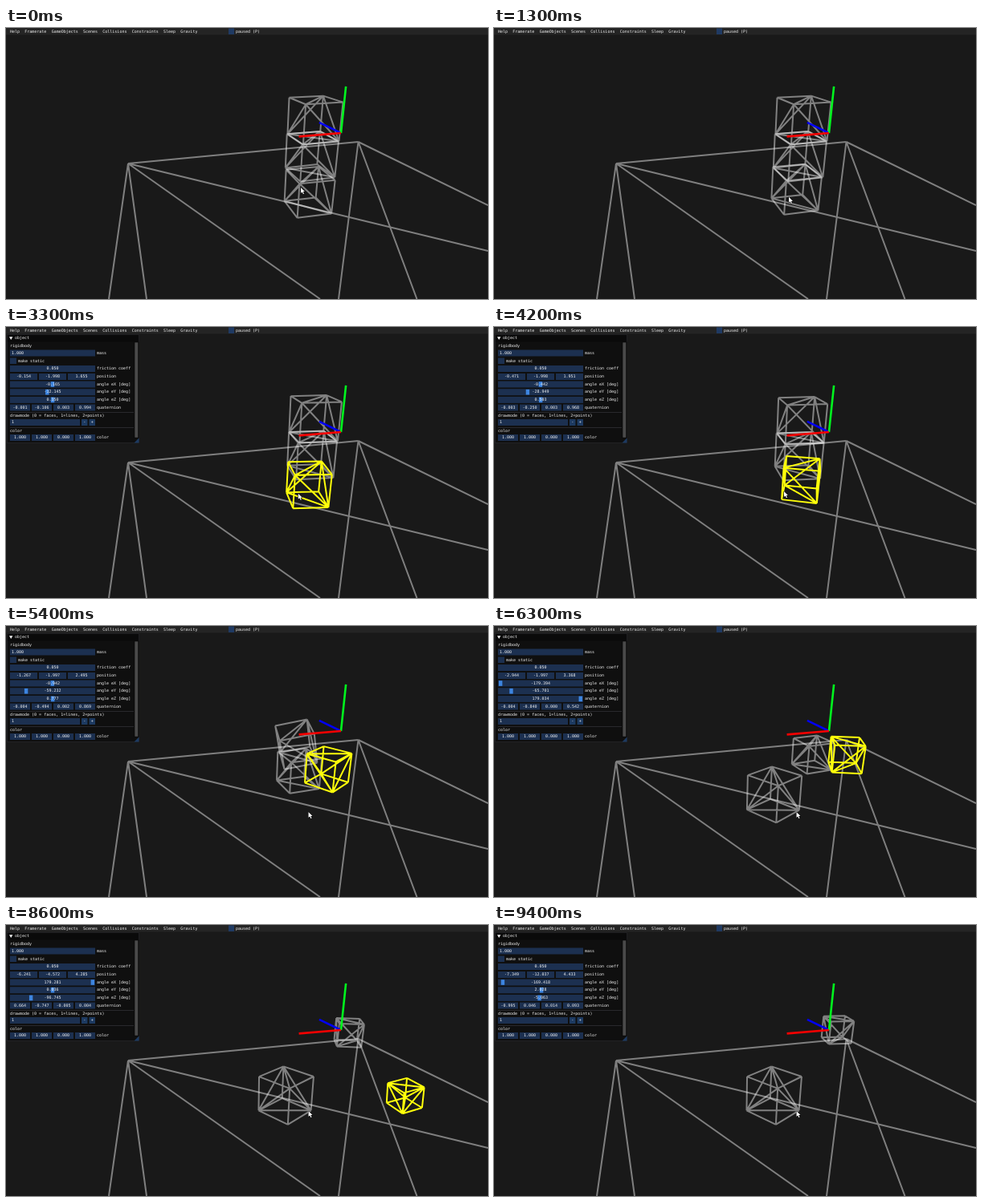
An HTML page with a canvas that plays this animation: 600x338 px, repeating every 9.5 s.

```html
<!DOCTYPE html>
<html lang="en">
<head>
<meta charset="utf-8">
<title>Rigid body stack</title>
<style>
html, body { margin: 0; width: 100%; height: 100%; overflow: hidden; background: #191919; }
canvas { display: block; width: 600px; height: 338px; }
</style>
</head>
<body>
<canvas id="stage" width="600" height="338"></canvas>
<script>
const ctx = document.getElementById('stage').getContext('2d');
const LOOP = 9500, STEP = 100;
const RAD = Math.PI / 180;
const FONT = '5px "DejaVu Sans Mono", monospace';

// Phases in seconds: settle, select, drag, slide over the floor, drop off its edge.
const UNPAUSE = 1, SELECT = 1.4, DRAG = 2.3, SLIDE = 5.4, EDGE = 7.8;

const clamp = (v, lo, hi) => Math.max(lo, Math.min(hi, v));
const span = (t, from, to) => clamp((t - from) / (to - from), 0, 1);
const smooth = u => u * u * (3 - 2 * u);
const easeOut = (u, power) => 1 - (1 - u) ** power;
const mix = (a, b, u) => a + (b - a) * u;

// ---- quaternions as [x, y, z, w] ----
function fromEuler([ex, ey, ez]) {
  return multiply(spin(2, ez), multiply(spin(1, ey), spin(0, ex)));
}
function toEuler([x, y, z, w]) {
  return [
    Math.atan2(2 * (w * x + y * z), w * w - x * x - y * y + z * z),
    Math.asin(clamp(2 * (w * y - x * z), -1, 1)),
    Math.atan2(2 * (x * y + w * z), w * w + x * x - y * y - z * z)
  ].map(a => a / RAD);
}
function axisAngle(axis, deg) {
  const half = deg * RAD / 2;
  return [...axis.map(v => v * Math.sin(half)), Math.cos(half)];
}
const spin = (axis, deg) => axisAngle([0, 1, 2].map(i => +(i === axis)), deg);
function multiply([ax, ay, az, aw], [bx, by, bz, bw]) {
  return [aw * bx + ax * bw + ay * bz - az * by, aw * by - ax * bz + ay * bw + az * bx,
          aw * bz + ax * by - ay * bx + az * bw, aw * bw - ax * bx - ay * by - az * bz];
}
function rotate(q, v) {
  const inverse = [-q[0], -q[1], -q[2], q[3]];
  return multiply(multiply(q, [...v, 0]), inverse).slice(0, 3);
}

// ---- motion ----
// Selected cube: dragged out, slides with friction, then falls and tumbles.
function bodyPose(t) {
  const sunk = 1 - smooth(span(t, UNPAUSE, SELECT));
  const u = span(t, DRAG, SLIDE);
  const s = clamp(t - SLIDE, 0, EDGE - SLIDE);
  const f = Math.max(0, t - EDGE);
  const turned = u ** 1.55;
  const dragged = fromEuler([-0.002 - 0.94 * turned, -2.285 - 56.947 * turned, 0.261 + 0.516 * turned]);
  const yawed = multiply(spin(1, -s * (68.2 - 7.8 * s)), dragged);
  const tumble = multiply(spin(2, -114.6 * Math.max(0, f - 0.07)), spin(0, 2.56 * f ** 3));
  return {
    pos: [
      -0.048 - 1.219 * u ** 2.16 - s * (2.014 - 0.168 * s) - 1.385 * f,
      -1.999 + 0.002 * u - 0.06 * sunk - f * (0.163 + 3.82 * f),
      1.489 + 1.006 * u ** 1.59 + s * (1.142 - 0.1907 * s) + 0.185 * f - 0.1 * sunk
    ],
    turn: multiply(yawed, tumble)
  };
}

// Middle cube: drops to the floor and is pushed until friction stops it.
function middlePose(t) {
  const u = span(t, DRAG, SLIDE), drop = u ** 6;
  const s = span(t, SLIDE, 9.8);
  const yaw = -12 * Math.sin(Math.PI * u) + 2 * u + 76 * smooth(span(t, SLIDE, 9.4)) ** 1.5;
  return {
    pos: [
      -0.07 - 0.22 * drop - 4.14 * easeOut(s, 2),
      -1.02 - 0.97 * drop,
      1.46 + 1.15 * drop + 3.7 * easeOut(s, 1.6)
    ],
    turn: spin(1, yaw)
  };
}

// Top cube: tips over and rolls towards the viewer.
function topPose(t) {
  const u = span(t, DRAG, SLIDE), drop = u ** 6;
  const roll = easeOut(span(t, SLIDE, 6.4), 1.5);
  const yaw = mix(-14 * Math.sqrt(u), -61, roll);
  const tilt = mix(16 * drop, 90, roll);
  return {
    pos: [
      mix(-0.1 - 0.1 * drop, 0.753, roll),
      mix(-0.03 - 1.12 * drop, -1.99, roll),
      mix(1.49 + 1.21 * drop, 1.114, roll)
    ],
    turn: multiply(axisAngle([-0.484, 0, -0.875], tilt), spin(1, yaw))
  };
}

// ---- camera ----
const YAW = 16.1 * RAD, PITCH = 20.9 * RAD, FOCAL = 408;
const EYE = { right: 2.053, up: 0.667, depth: 7.16 };
function project([x, y, z]) {
  const right = EYE.right - x * Math.cos(YAW) - z * Math.sin(YAW);
  const ahead = z * Math.cos(YAW) - x * Math.sin(YAW);
  const up = EYE.up + y * Math.cos(PITCH) + ahead * Math.sin(PITCH);
  const depth = EYE.depth + ahead * Math.cos(PITCH) - y * Math.sin(PITCH);
  return [300 + FOCAL * right / depth, 169 - FOCAL * up / depth];
}

// Cube edges plus one diagonal per face.
const bits = n => (n & 1) + (n >> 1 & 1) + (n >> 2 & 1);
const corners = [...Array(8).keys()].map(i => [0, 1, 2].map(k => (i >> k & 1) - 0.5));
const edges = [];
for (let i = 0; i < 8; i++) {
  for (let j = i + 1; j < 8; j++) {
    const d = bits(i ^ j);
    if (d === 1 || (d === 2 && bits(i) % 2 === 0)) edges.push([i, j]);
  }
}

function lines(pairs, color, width) {
  ctx.strokeStyle = color;
  ctx.lineWidth = width;
  ctx.beginPath();
  for (const [a, b] of pairs) {
    ctx.moveTo(...a);
    ctx.lineTo(...b);
  }
  ctx.stroke();
}
function drawCube({ pos, turn }, color) {
  const pts = corners.map(c => project(rotate(turn, c).map((v, i) => v + pos[i])));
  lines(edges.map(([i, j]) => [pts[i], pts[j]]), color, 2);
}

const GREY = 'rgba(255,255,255,0.45)';
function drawFloor() {
  const left = [152, 169], right = [438.5, 142];
  const fan = (from, ends) => lines(ends.map(end => [from, end]), '#7f7f7f', 2);
  fan(left, [right, [128, 338], [175, 338], [391, 338], [600, 278]]);
  fan(right, [[414, 338], [511.5, 338], [600, 221]]);
}
function drawAxes() {
  const origin = project([0, 0, 0]);
  const axis = (tip, color) => lines([[origin, project(tip)]], color, 2.6);
  axis([0, 0, 1], '#0000f5');
  axis([0, 1, 0], '#00f51e');
  axis([1, 0, 0], '#f50000');
}

// ---- interface ----
const FIELD = '#1c3050', BUTTON = '#1d3a61', GRAB = '#3d85e0', INK = '#f2f2f2';
function box(x, y, w, h, color) {
  ctx.fillStyle = color;
  ctx.fillRect(x, y, w, h);
}
function triangle(color, ...points) {
  ctx.fillStyle = color;
  ctx.beginPath();
  points.forEach(p => ctx.lineTo(...p));
  ctx.fill();
}
function text(str, x, y, align = 'left') {
  ctx.fillStyle = INK;
  ctx.textAlign = align;
  ctx.fillText(str, x, y);
}
const fixed = v => (+v.toFixed(3) || 0).toFixed(3);

function fields(values, y, label) {
  const n = values.length, w = (106 - 2 * (n - 1)) / n;
  values.forEach((v, i) => {
    const x = 5 + i * (w + 2);
    box(x, y - 4, w, 8, FIELD);
    text(fixed(v), x + w / 2, y, 'center');
  });
  text(label, 113, y);
}
function slider(value, range, y, label) {
  box(5, y - 4, 106, 8, FIELD);
  box(55.8 + 50 * value / range, y - 3.3, 4.4, 6.6, GRAB);
  text(fixed(value), 58, y, 'center');
  text(label, 113, y);
}

function drawMenu() {
  box(0, 0, 600, 8.5, '#242424');
  let x = 5;
  for (const name of 'Help Framerate GameObjects Scenes Collisions Constraints Sleep Gravity'.split(' ')) {
    text(name, x, 4.3);
    x += ctx.measureText(name).width + 6.25;
  }
  box(277, 0.5, 7, 7.5, '#1f3a63');
  text('paused (P)', 286, 4.3);
}

function drawPanel({ pos, turn }) {
  box(1.5, 9.5, 164, 135, '#0f0f0f');
  box(1.5, 9.5, 164, 9, '#0a0a0a');
  ctx.strokeStyle = '#2b2b30';
  ctx.lineWidth = 0.6;
  ctx.strokeRect(1.5, 9.5, 164, 135);
  triangle(INK, [4, 12.3], [8.4, 12.3], [6.2, 16]);
  text('object', 11, 14);

  box(159.5, 18.5, 6, 120, '#080808');
  box(160.3, 19.3, 4, 118.5, '#4a4a4a');
  triangle(BUTTON, [165.5, 138.5], [165.5, 144.5], [159.5, 144.5]);

  const angles = toEuler(turn);
  text('rigidbody', 5, 24);
  box(5, 28.5, 106, 8, FIELD);
  text('1.000', 7, 32.5);
  text('mass', 113, 32.5);
  box(5, 38.5, 8, 7.5, FIELD);
  text('make static', 15, 42.5);
  fields([0.05], 52, 'friction coeff');
  fields(pos, 62, 'position');
  ['X', 'Y', 'Z'].forEach((axis, i) => {
    slider(angles[i], i === 1 ? 90 : 180, 71.5 + 9.7 * i, `angle e${axis} [deg]`);
  });
  fields(fromEuler(angles), 100.5, 'quaternion');
  box(5, 106, 154, 0.6, '#3a3a40');
  text('drawmode (0 = faces, 1=lines, 2=points)', 5, 110.5);
  box(5, 115, 87, 8, FIELD);
  text('1', 7, 119);
  ['-', '+'].forEach((sign, i) => {
    box(94 + 9.5 * i, 115, 7.5, 8, BUTTON);
    text(sign, 97.8 + 9.5 * i, 119, 'center');
  });
  box(5, 125, 154, 0.6, '#3a3a40');
  text('color', 5, 129.5);
  fields([1, 1, 0, 1], 138, 'color');
}

function drawCursor(t) {
  const pull = smooth(span(t, DRAG, 4.2)), away = smooth(span(t, 5, SLIDE));
  ctx.save();
  ctx.translate(367 - 6 * pull + 15.5 * away, 199 + 12 * smooth(span(t, 0.1, SELECT)) - 6 * pull + 27 * away);
  const arrow = new Path2D('M0 0V7L1.7 5.5 2.9 8.2 4 7.7 2.9 5.1H5Z');
  ctx.strokeStyle = '#000';
  ctx.lineWidth = 1;
  ctx.stroke(arrow);
  ctx.fillStyle = '#fff';
  ctx.fill(arrow);
  ctx.restore();
}

function draw(t) {
  box(0, 0, 600, 338, '#191919');
  ctx.font = FONT;
  ctx.textBaseline = 'middle';
  const body = bodyPose(t), selected = t >= SELECT;
  drawFloor();
  drawCube(topPose(t), GREY);
  drawCube(middlePose(t), GREY);
  drawCube(body, selected ? '#ffff0a' : GREY);
  drawAxes();
  drawMenu();
  if (selected) drawPanel(body);
  drawCursor(t);
}

const start = performance.now();
function tick() {
  const ms = Math.max(0, performance.now() - start) % LOOP;
  draw(Math.floor(ms / STEP) * STEP / 1000);
  requestAnimationFrame(tick);
}
tick();
</script>
</body>
</html>
```
